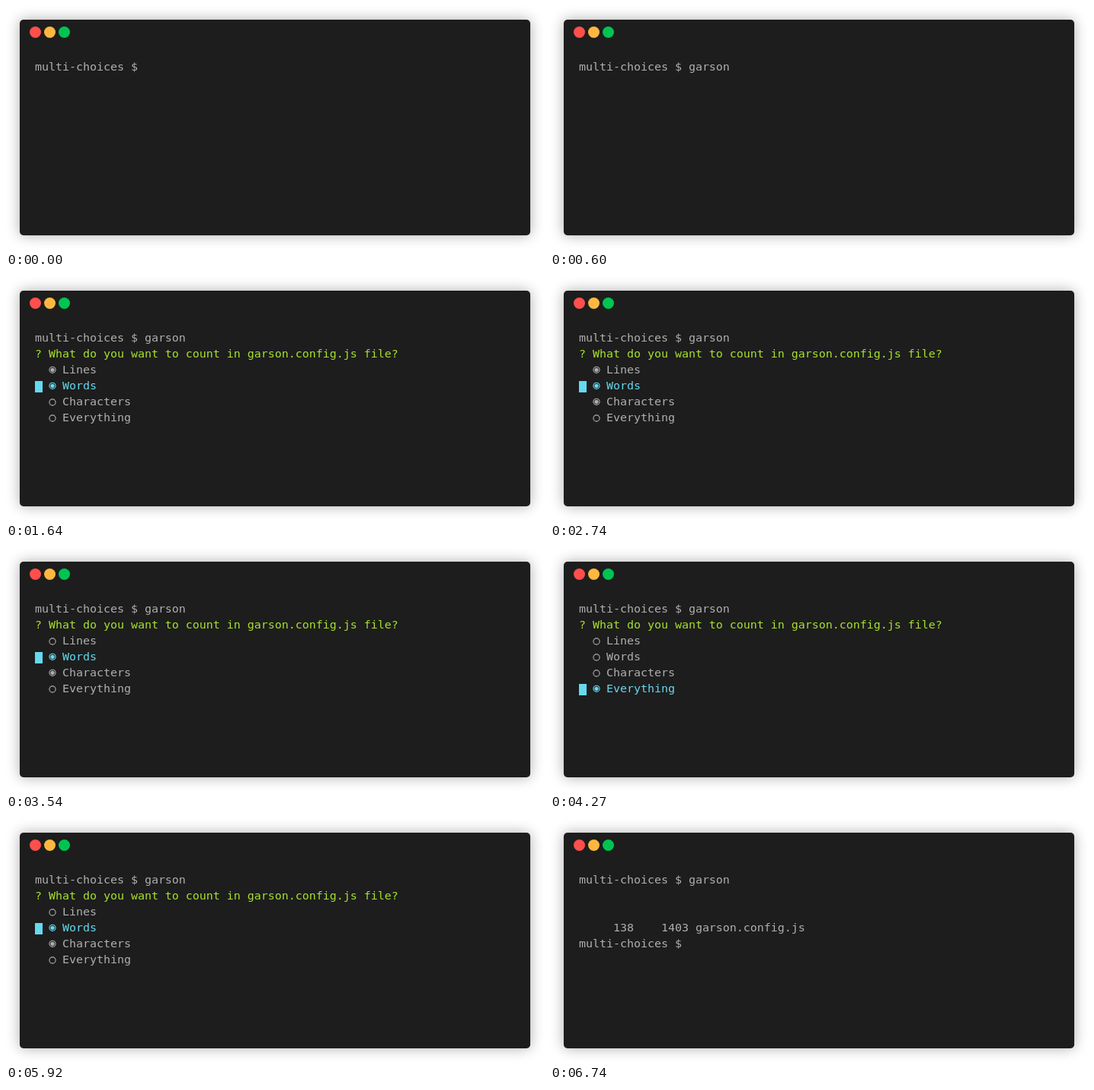
Write an HTML page that moves like this. It is 706 px wide and 320 px high and loops after 8840 ms.

```html
<!DOCTYPE html>
<html lang="en">
<head>
<meta charset="utf-8">
<title>garson multi-choices</title>
<style>
  html, body { margin: 0; width: 100%; height: 100%; overflow: hidden; background: #fff; }
  .window {
    position: absolute; left: 18px; top: 18px; width: 670px; height: 284px;
    border-radius: 5px; background: #1d1d1d; box-shadow: 0 0 18px rgba(0, 0, 0, .32);
  }
  svg { position: absolute; left: 0; top: 0; }
  text { font: 14.95px "DejaVu Sans Mono", monospace; white-space: pre; }
</style>
</head>
<body>
<div class="window"></div>
<svg width="706" height="320">
  <circle cx="38.5" cy="34.5" r="7.5" fill="#ff4f4d"/>
  <circle cx="57.5" cy="34.5" r="7.5" fill="#ffb83f"/>
  <circle cx="76.5" cy="34.5" r="7.5" fill="#00c451"/>
  <g id="screen"></g>
</svg>
<script>
const LOOP = 8840, LEFT = 38, COL = 9, ROW = 21, BASE = 85;
const GREY = '#afafaf', GREEN = '#a6e22e', CYAN = '#66d9ef';
const PROMPT = 'multi-choices $ ', COMMAND = 'garson';
const OPTIONS = ['Lines', 'Words', 'Characters', 'Everything'];
const MENU_START = 960, MENU_END = 6540;

// Menu states: start time, highlighted option, checked options
const MENU = [
  [MENU_START, 0, '01'], [1640, 1, '01'], [1900, 2, '01'], [2310, 2, '012'],
  [2740, 1, '012'], [3000, 0, '012'], [3260, 0, '12'], [3540, 1, '12'],
  [3710, 2, '12'], [3890, 3, '12'], [4270, 3, '3'], [4720, 2, '3'],
  [5090, 2, '2'], [5560, 1, '2'], [5920, 1, '12']
];

const baseline = row => BASE + row * ROW;

const line = (row, str, color = GREY, col = 0) =>
  `<text x="${LEFT + col * COL}" y="${baseline(row)}" fill="${color}">${str}</text>`;

function radio(row, checked, color) {
  const y = baseline(row) - (checked ? 4.7 : 4);
  const ring = `<circle cx="61" cy="${y}" r="4.1" fill="none" stroke="${color}" stroke-width="1.1"/>`;
  return checked ? ring + `<circle cx="61" cy="${y}" r="2.6" fill="${color}"/>` : ring;
}

function menu(t) {
  const [, active, checked] = MENU.findLast(state => state[0] <= t);
  const rows = OPTIONS.map((label, i) => {
    const row = i + 2, color = i === active ? CYAN : GREY;
    const pointer = i === active
      ? `<rect x="${LEFT}" y="${baseline(row) - 11}" width="10" height="15" fill="${CYAN}"/>` : '';
    return pointer + radio(row, checked.includes(i), color) + line(row, label, color, 4);
  });
  return line(1, '? What do you want to count in garson.config.js file?', GREEN) + rows.join('');
}

function render(t) {
  const typed = Math.min(COMMAND.length, Math.floor(t / 100));
  let out = line(0, PROMPT + COMMAND.slice(0, typed));
  if (t >= MENU_START && t < MENU_END) out += menu(t);
  if (t >= 6640) out += line(3, '     138    1403 garson.config.js');
  if (t >= 6740) out += line(4, PROMPT);
  return out;
}

const screenGroup = document.getElementById('screen');
let shown;
function tick() {
  const next = render(performance.now() % LOOP);
  if (next !== shown) screenGroup.innerHTML = shown = next;
  requestAnimationFrame(tick);
}
tick();
</script>
</body>
</html>
```
